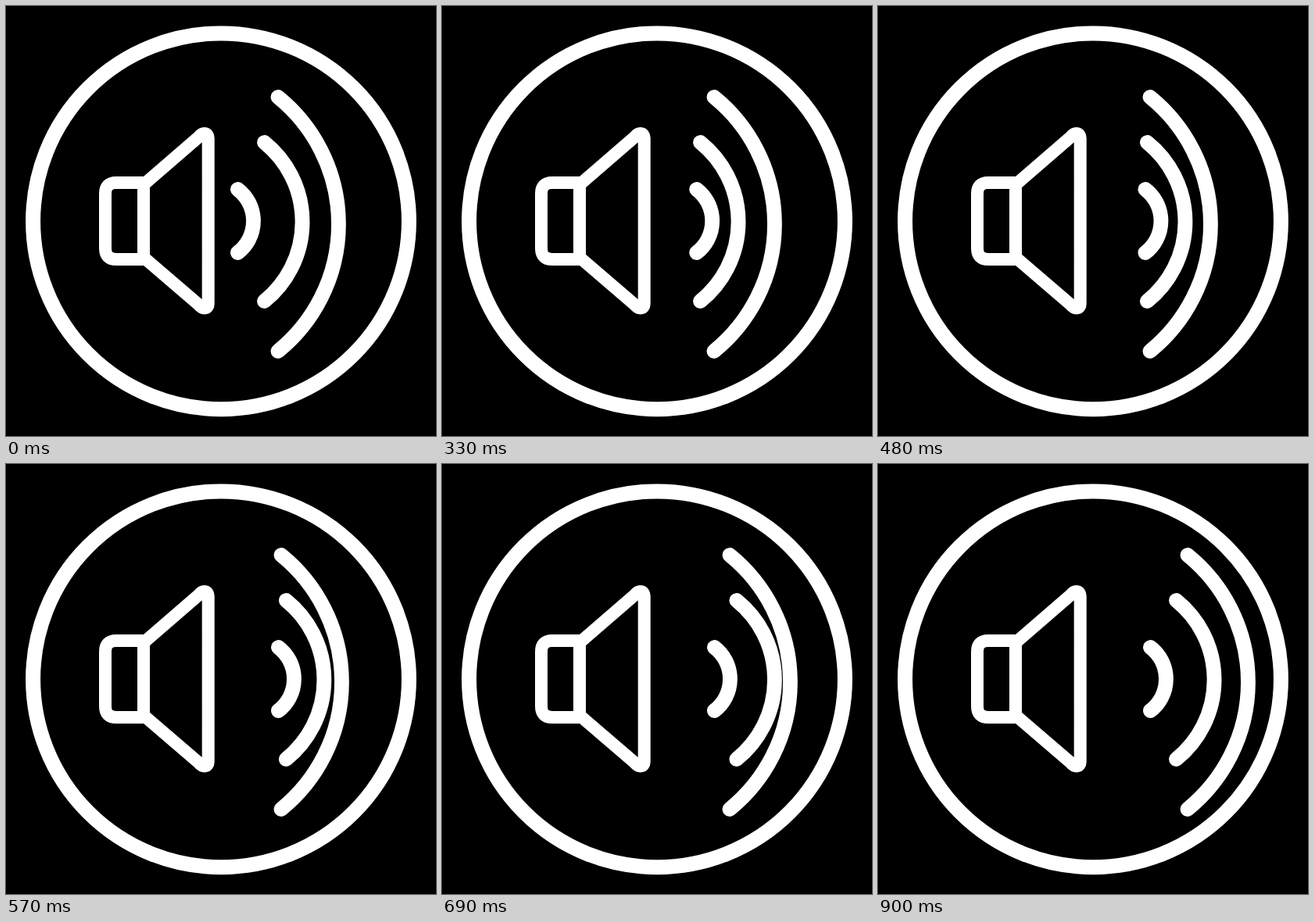
Write an HTML page that moves like this. It is 550x550 px and loops after 960 ms.

```html
<!DOCTYPE html>
<html lang="en">
<head>
<meta charset="utf-8">
<title>Speaker</title>
<style>
  html, body { margin: 0; width: 100%; height: 100%; overflow: hidden; background: #000; }
  svg { display: block; width: 100%; height: 100%; fill: none; stroke: #fff; stroke-linecap: round; stroke-linejoin: round; }
</style>
</head>
<body>
<svg viewBox="0 0 550 550">
  <circle cx="275" cy="275.3" r="240.4" stroke-width="19"/>
  <g stroke-width="16">
    <path d="M176 226H141Q127 226 127 240V310Q127 324 141 324H176"/>
    <path d="M176 228.5L246.500 167.500C252 161 258.700 162 258.700 169V381C258.700 387.500 252 388.500 246.500 382L176 321.500Z"/>
  </g>
  <g stroke-width="18.800">
    <path class="wave" d="M296.400 234.500A50.900 50.900 0 0 1 296.400 315.500"/>
    <path class="wave" d="M330.500 174.500A130.300 130.300 0 0 1 330.500 377.500"/>
    <path class="wave" d="M348 116.500A209.200 209.200 0 0 1 348 441.500"/>
  </g>
</svg>
<script>
  const LOOP = 960, STEP = 30, LAST = 30;
  // Each wave slides right at constant speed between two steps.
  const moves = [
    { from: 2, to: 18, dx: 52 },
    { from: 13, to: 24, dx: 51 },
    { from: 18, to: 30, dx: 48 }
  ];
  const waves = document.querySelectorAll('.wave');
  const clamp = u => Math.min(1, Math.max(0, u));
  const start = performance.now();

  function draw(now) {
    const time = Math.max(0, now - start) % LOOP;
    const step = Math.min(LAST, Math.floor(time / STEP));
    moves.forEach(({ from, to, dx }, i) => {
      const x = dx * clamp((step - from) / (to - from));
      waves[i].setAttribute('transform', `translate(${x} 0)`);
    });
    requestAnimationFrame(draw);
  }
  draw(start);
</script>
</body>
</html>
```
